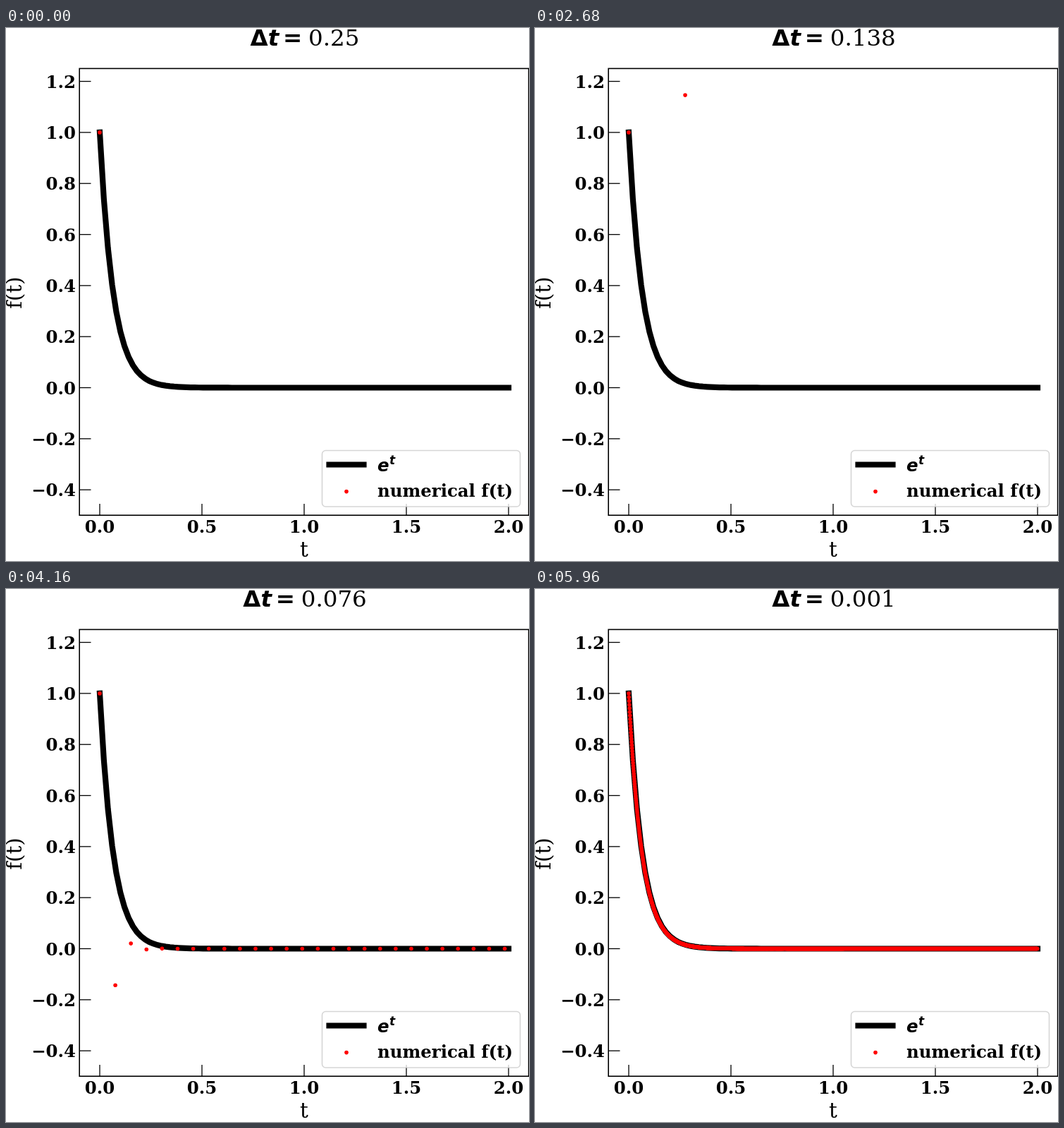
Write an HTML page with a canvas that moves like this. It is 742 by 755 pixels and loops after 6000 ms.

```html
<!DOCTYPE html>
<html>
<head>
<meta charset="utf-8">
<style>
html, body { margin: 0; width: 100%; height: 100%; overflow: hidden; background: #fff; }
canvas { display: block; }
</style>
</head>
<body>
<canvas id="stage" width="742" height="755"></canvas>
<script>
const ctx = document.getElementById('stage').getContext('2d');
const LEFT = 104.2, RIGHT = 741.6, TOP = 57.4, BOTTOM = 690.2;
const RATE = 15, STEPS = 150, STEP_MS = 40;
const SERIF = '"DejaVu Serif", "Noto Serif", serif';
const SANS = '"DejaVu Sans", sans-serif';
const TICK_FONT = `bold 24.4px ${SERIF}`;
const LABEL_FONT = `29.3px ${SERIF}`;

const px = t => 133 + 290 * t;
const py = f => 509.5 - 361.6 * f;

function text(str, x, y, font, align = 'left') {
  ctx.font = font;
  ctx.textAlign = align;
  ctx.fillStyle = '#000';
  ctx.fillText(str, x, y);
}

function line(points, width, cap = 'butt') {
  ctx.beginPath();
  points.forEach(([x, y]) => ctx.lineTo(x, y));
  ctx.strokeStyle = '#000';
  ctx.lineWidth = width;
  ctx.lineCap = cap;
  ctx.stroke();
}

function dot(x, y) {
  ctx.beginPath();
  ctx.arc(x, y, 2.8, 0, 7);
  ctx.fillStyle = '#f00';
  ctx.fill();
}

function title(dt) {
  const value = String(+dt.toFixed(3)), prefix = 82.5;
  ctx.font = `32.5px ${SERIF}`;
  const x = 424 - (prefix + ctx.measureText(value).width) / 2;
  text('Δ', x, 25, `bold 32.5px ${SANS}`);
  text('t', x + 25.2, 25, `italic bold 32.5px ${SANS}`);
  text('=', x + 46.5, 25, `bold 32.5px ${SANS}`);
  text(value, x + prefix, 25, `32.5px ${SERIF}`);
}

const exact = Array.from({ length: 100 }, (_, i) => {
  const t = 2 * i / 99;
  return [px(t), py(Math.exp(-RATE * t))];
});

// Forward Euler solution of f' = -RATE * f
function eulerDots(dt) {
  ctx.save();
  ctx.beginPath();
  ctx.rect(LEFT, TOP, RIGHT - LEFT, BOTTOM - TOP);
  ctx.clip();
  let f = 1;
  for (let n = 0; n * dt < 2 - 1e-9; n++) {
    if (Math.abs(f) < 2) dot(px(n * dt), py(f));
    f *= 1 - RATE * dt;
  }
  ctx.restore();
}

function axes() {
  for (let i = 0; i <= 4; i++) {
    const x = px(i / 2);
    line([[x, BOTTOM], [x, BOTTOM - 16.3]], 1.3);
    text((i / 2).toFixed(1), x, 715, TICK_FONT, 'center');
  }
  for (let i = -2; i <= 6; i++) {
    const y = py(i / 5);
    line([[LEFT, y], [LEFT + 16.3, y]], 1.3);
    text((i / 5).toFixed(1).replace('-', '\u2212'), 99, y + 9, TICK_FONT, 'right');
  }
  ctx.lineWidth = 1.6;
  ctx.strokeRect(LEFT, TOP, RIGHT - LEFT, BOTTOM - TOP);
  text('t', 423, 749, LABEL_FONT, 'center');
  ctx.save();
  ctx.translate(22, 375);
  ctx.rotate(-Math.PI / 2);
  text('f(t)', 0, 0, LABEL_FONT, 'center');
  ctx.restore();
}

function legend() {
  ctx.beginPath();
  ctx.roundRect(448.5, 598.5, 281, 79.5, 5);
  ctx.fillStyle = 'rgba(255,255,255,.8)';
  ctx.fill();
  ctx.strokeStyle = 'rgba(204,204,204,.8)';
  ctx.lineWidth = 1.6;
  ctx.stroke();
  line([[458.5, 618.5], [507.5, 618.5]], 8.2, 'square');
  text('e', 527, 627.5, `italic bold 24.4px ${SANS}`);
  text('t', 544, 618, `italic bold 17px ${SANS}`);
  dot(483, 656.6);
  text('numerical f(t)', 527, 663.5, TICK_FONT);
}

function draw() {
  const step = Math.floor(performance.now() / STEP_MS) % STEPS;
  const dt = 0.25 - 0.249 * step / (STEPS - 1);
  ctx.fillStyle = '#fff';
  ctx.fillRect(0, 0, 742, 755);
  line(exact, 8.2, 'square');
  eulerDots(dt);
  axes();
  legend();
  title(dt);
  requestAnimationFrame(draw);
}
draw();
</script>
</body>
</html>
```
